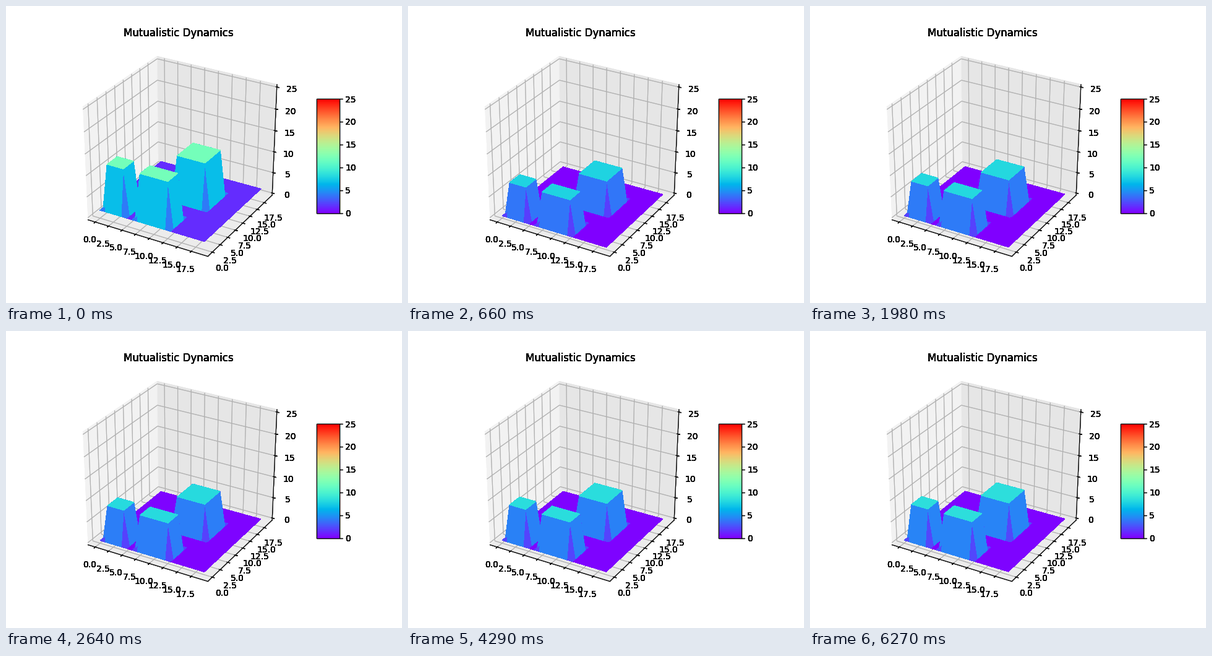
A matplotlib script for the animation above (6600 ms loop, 640 by 480 pixels).

```python
import math

import matplotlib.pyplot as plt
import numpy as np
from matplotlib.animation import FuncAnimation
from matplotlib.cm import ScalarMappable
from matplotlib.colors import Normalize
from mpl_toolkits.mplot3d import Axes3D

FRAMES, STEP = 20, 330
N, Z_MAX = 20, 25
PASSES = 6  # repeated drawing hardens the antialiased edges
BLOCKS = [((1, 4), (1, 4)), ((7, 12), (1, 4)), ((9, 14), (9, 14))]
NORM = Normalize(0, Z_MAX)


class WideAxes(Axes3D):
    """3D axes that fill their rectangle instead of a square."""

    def apply_aspect(self, position=None):
        pass


def overdraw(artist):
    base = artist.draw

    def draw(renderer):
        for _ in range(PASSES):
            base(renderer)

    artist.draw = draw


def padded(lo, hi):
    pad = (hi - lo) / 48
    return lo - pad, hi + pad


def settle(t, start, end, dip):
    """Fast drop below the resting level, then a slow return to it."""
    slow = dip * math.exp(-t / 2000)
    fast = (start - end + dip) * math.exp(-t / 200)
    return end - slow + fast


fig = plt.figure(figsize=(6.4, 4.8), dpi=100, facecolor="white")
ax = WideAxes(fig, [0.125, 0.11, 0.62, 0.77])
fig.add_axes(ax)
ax.patch.set_alpha(0)
ax.set_box_aspect((1, 1, 1), zoom=math.sqrt(3) / 1.8294640721620434)
ax.view_init(elev=30, azim=-60)
margin = 0.05 * (N - 1)
ax.set_xlim(*padded(-margin, N - 1 + margin))
ax.set_ylim(*padded(-margin, N - 1 + margin))
ax.set_zlim(*padded(0, Z_MAX))
ax.set_xticks(np.arange(0, 18, 2.5))
ax.set_yticks(np.arange(0, 18, 2.5))
ax.set_zticks(range(0, Z_MAX + 1, 5))
ax.set_title("Mutualistic Dynamics")

cax = fig.add_axes([0.78375, 0.3025, 0.05775, 0.385])
fig.colorbar(ScalarMappable(NORM, "rainbow"), cax=cax,
             ticks=range(0, Z_MAX + 1, 5))
overdraw(ax)
overdraw(cax)

X, Y = np.meshgrid(np.arange(N), np.arange(N))
mask = np.zeros((N, N), bool)
for (x0, x1), (y0, y1) in BLOCKS:
    mask[y0:y1 + 1, x0:x1 + 1] = True

surface = None


def update(i):
    global surface
    if surface is not None:
        surface.remove()
    t = i * STEP
    high = settle(t, 12, 8.55, 1.35)
    low = max(0, settle(t, 1.4, 0.2, 0.3))
    surface = ax.plot_surface(X, Y, np.where(mask, high, low), cmap="rainbow",
                              norm=NORM, linewidth=0, antialiased=False)
    return surface,


anim = FuncAnimation(fig, update, frames=FRAMES, interval=STEP,
                     init_func=lambda: update(0), repeat=True,
                     repeat_delay=0, blit=False)
plt.show()
```
